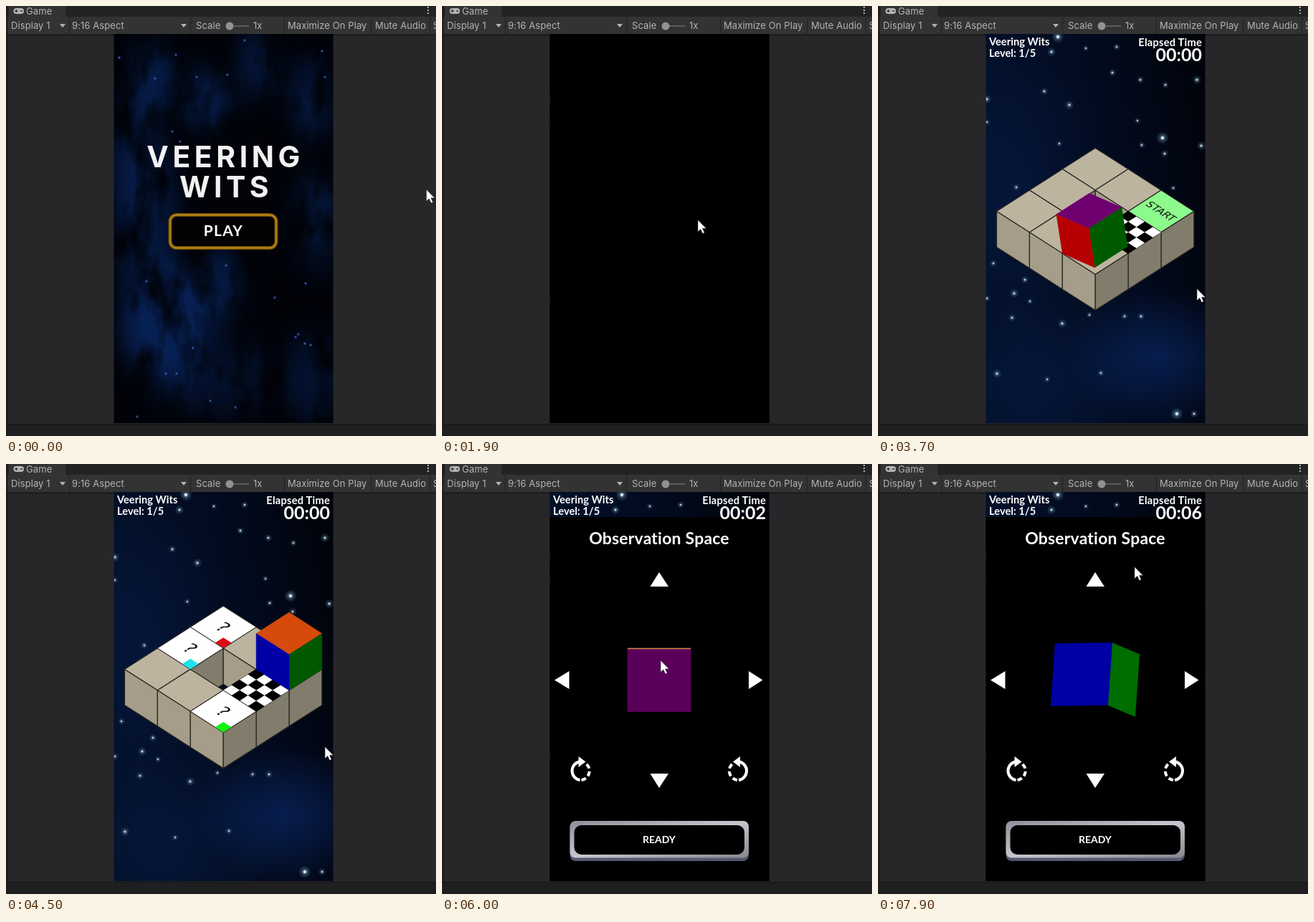
Write an HTML page that moves like this. It is 600 px wide and 600 px high and loops after 8000 ms.

```html
<!DOCTYPE html>
<html lang="en">
<head>
<meta charset="utf-8">
<title>Cube puzzle</title>
<style>
  html, body { margin: 0; width: 100%; height: 100%; overflow: hidden; background: #272628; }
  svg { display: block; width: 100%; height: 100%; }
  .ui { font: 13px Inter, sans-serif; letter-spacing: .08px; fill: #b4b4b4; }
  .game { font: 700 14.7px Lato, sans-serif; fill: #fff; }
  .title { font: 700 41px Inter, sans-serif; letter-spacing: 5.5px; fill: #f2f2f2; }
  .tile { font-family: "DejaVu Sans", sans-serif; text-anchor: middle; fill: #111; }
  .mid { text-anchor: middle; }
  .end { text-anchor: end; }
</style>
</head>
<body>
<svg viewBox="0 0 600 600">
  <defs>
    <clipPath id="screen"><rect x="150.5" y="39" width="306" height="543"/></clipPath>
    <filter id="cloud" x="-20%" y="-20%" width="140%" height="140%" color-interpolation-filters="sRGB">
      <feGaussianBlur in="SourceGraphic" stdDeviation="16 20" result="soft"/>
      <feTurbulence type="fractalNoise" baseFrequency=".028 .014" numOctaves="4" seed="4"/>
      <feColorMatrix values="0 0 0 0 0  0 0 0 0 0  0 0 0 0 0  2.6 0 0 0 -.6" result="wisps"/>
      <feComposite in="soft" in2="wisps" operator="in"/>
    </filter>
    <radialGradient id="star">
      <stop offset="0" stop-color="#fff"/>
      <stop offset=".16" stop-color="#cfe6ee"/>
      <stop offset=".36" stop-color="#6f95ae" stop-opacity=".45"/>
      <stop offset="1" stop-color="#4d7fa8" stop-opacity="0"/>
    </radialGradient>
    <radialGradient id="glow">
      <stop offset="0" stop-color="#0b2a6c" stop-opacity=".62"/>
      <stop offset=".5" stop-color="#0b2a6c" stop-opacity=".34"/>
      <stop offset="1" stop-color="#0b2a6c" stop-opacity="0"/>
    </radialGradient>
    <linearGradient id="sky" x1="0" y1=".3" x2="1" y2="0">
      <stop offset="0" stop-color="#031029"/>
      <stop offset=".55" stop-color="#020a1e"/>
      <stop offset="1" stop-color="#010308"/>
    </linearGradient>
    <linearGradient id="steel" x1="0" y1="0" x2="1" y2="1">
      <stop offset="0" stop-color="#8d8f9a"/>
      <stop offset=".5" stop-color="#c6c7cd"/>
      <stop offset="1" stop-color="#85878f"/>
    </linearGradient>
    <g id="turn" fill="none" stroke="#fff" stroke-width="4">
      <path d="M0 13A13 13 0 0 1 -1 -12.500"/>
      <path d="M6 -11.500A13 13 0 0 1 2 13" stroke-dasharray="7 4" stroke-dashoffset="-4"/>
      <path d="M-2 -20L8 -12.500L-2 -5Z" fill="#fff" stroke="none"/>
    </g>
  </defs>

  <g id="editor">
    <rect width="600" height="600" fill="#272628"/>
    <rect width="600" height="15" fill="#232324"/>
    <rect x="4" width="79" height="15" fill="#343334"/>
    <rect y="15" width="600" height="24" fill="#343334"/>
    <rect y="39" width="600" height="3" fill="#1f1f20"/>
    <rect y="583" width="600" height="17" fill="#1f1e20"/>
    <path d="M0 583.5H600" stroke="#151515"/>
    <path d="M1.5 0V583" stroke="#181818" stroke-width="1.5"/>
    <path d="M88.5 16V39M257.5 16V39M388.5 16V39M509.5 16V39M591.5 16V39" stroke="#262626" stroke-width="1.5"/>
    <path d="M75 25h8l-4 5zM244 25h8l-4 5z" fill="#b4b4b4"/>
    <path d="M316 28H339" stroke="#5c5c5c" stroke-width="2"/>
    <circle cx="312" cy="28" r="5.5" fill="#929292"/>
    <rect x="10.500" y="3" width="14.500" height="8" rx="4" fill="#b4b4b4"/>
    <path d="M12.500 7h4M14.500 5v4M20 7h3" stroke="#343334" stroke-width="1.3"/>
    <path d="M589 1v2M589 5v2M589 9v2" stroke="#b4b4b4" stroke-width="2"/>
    <g class="ui">
      <text x="28" y="12">Game</text><text x="7" y="32">Display 1</text>
      <text x="92" y="32">9:16 Aspect</text><text x="265" y="32">Scale</text>
      <text x="345" y="32">1x</text><text x="393" y="32">Maximize On Play</text>
      <text x="515" y="32">Mute Audio</text><text x="596" y="32">S</text>
    </g>
  </g>

  <g clip-path="url(#screen)">
    <g id="menu">
      <rect x="150" y="39" width="307" height="544" fill="#010309"/>
      <g id="nebula" filter="url(#cloud)"></g>
      <g id="sparks"></g>
      <text class="title mid" x="306" y="225">VEERING</text>
      <text class="title mid" x="307" y="267">WITS</text>
      <rect x="229" y="291.500" width="148" height="46" rx="9" fill="#020204" stroke="#6d4c06" stroke-width="5"/>
      <rect x="229" y="291.500" width="148" height="46" rx="9" fill="none" stroke="#b58414" stroke-width="2.400"/>
      <text class="game mid" x="303.500" y="321" style="font-size:21px;letter-spacing:1.2px">PLAY</text>
    </g>

    <g id="level">
      <rect x="150" y="39" width="307" height="544" fill="url(#sky)"/>
      <ellipse cx="390" cy="490" rx="130" ry="95" fill="url(#glow)"/>
      <ellipse cx="190" cy="240" rx="130" ry="210" fill="url(#glow)" opacity=".4"/>
      <ellipse cx="230" cy="520" rx="150" ry="130" fill="url(#glow)" opacity=".4"/>
      <g id="stars"></g>
      <g id="board" stroke="#26241f" stroke-width="1.200" stroke-linejoin="round"></g>
      <g id="puzzle"></g>
      <g id="roller"></g>
      <g id="observe">
        <rect x="150" y="74" width="307" height="509"/>
        <text class="game mid" x="303" y="112" style="font-size:23px;letter-spacing:.2px">Observation Space</text>
        <path fill="#fff" d="M290.500 171h25.500L303 151zM290.500 432h25.500L303 452zM157 301.500L177.500 289v25zM447.500 301.500L428 289v25z"/>
        <use href="#turn" transform="translate(192.500 428)"/>
        <use href="#turn" transform="translate(414 428) scale(-1 1)"/>
        <rect x="178.500" y="499" width="249.500" height="55" rx="8" fill="#565a70"/>
        <rect x="178.500" y="498" width="249.500" height="51.500" rx="8" fill="url(#steel)"/>
        <rect x="184.500" y="504" width="237.500" height="41" rx="10"/>
        <text class="game mid" x="303" y="528.500" style="font-size:14px">READY</text>
        <g id="viewer"></g>
        <path id="rim" d="M259 257.500H347" stroke="#d68a3c" stroke-width="1.400"/>
      </g>
      <g class="game">
        <text x="155" y="55">Veering Wits</text>
        <text x="155" y="70.500">Level: 1/5</text>
        <text class="end" x="452" y="55.500" style="letter-spacing:.2px">Elapsed Time</text>
        <text id="clock" class="end" x="452" y="77" style="font-size:25px"></text>
      </g>
    </g>
    <rect id="fade" x="150" y="39" width="307" height="544"/>
  </g>
  <path id="cursor" d="M0 0V16.500L3.800 13L6.600 19L9.300 17.800L6.600 11.900H11.800Z" fill="#fff" stroke="#222" stroke-width=".6"/>
</svg>

<script>
const LOOP = 8000;
const $ = id => document.getElementById(id);
const clamp = (v, a = 0, b = 1) => Math.min(b, Math.max(a, v));
const progress = (t, from, to) => clamp((t - from) / (to - from));
const smooth = p => p * p * (3 - 2 * p);
const show = (id, on) => $(id).setAttribute('display', on ? 'inline' : 'none');

function add(parent, tag, attrs, text = '') {
  const el = document.createElementNS('http://www.w3.org/2000/svg', tag);
  for (const k in attrs) el.setAttribute(k, attrs[k]);
  el.textContent = text;
  return parent.appendChild(el);
}
const pairs = s => s.split(' ').map(p => p.split(',').map(Number));

// Backgrounds
for (const [x, y, rx, ry, o] of [
  [205, 100, 30, 50, .8], [280, 135, 30, 45, .8], [350, 80, 30, 45, .6], [425, 130, 30, 55, .6],
  [435, 300, 28, 65, .7], [225, 440, 65, 80, .9], [300, 385, 30, 50, .7], [195, 300, 45, 110, .6],
  [290, 520, 90, 50, .4], [425, 520, 40, 60, .45], [180, 200, 40, 90, .5]
]) add($('nebula'), 'ellipse', { cx: x, cy: y, rx, ry, fill: '#08245c', opacity: o });

const sparks = pairs('237,68 266,99 333,48 441,63 445,99 232,175 243,189 196,384 375,407 418,387 404,462 ' +
  '408,458 417,471 261,477 183,573 307,362 223,513 238,513 285,551 320,560 425,473 158,72 208,101 309,96');
sparks.forEach(([cx, cy], i) => {
  add($('sparks'), 'circle', { cx, cy, r: 2.2, fill: '#2456b8', opacity: .4 });
  add($('sparks'), 'circle', { cx, cy, r: .8, fill: i % 3 ? '#7486dd' : '#62b0dd' });
});

const stars = pairs('232,119 267,138 290,59 333,57 366,103 445,103 362,160 368,194 400,206 451,195 253,192 ' +
  '193,253 327,93 242,64 412,254 161,359 205,382 190,401 212,412 152,408 187,435 257,443 295,431 344,433 ' +
  '367,433 166,513 236,521 311,512 441,569 152,130 152,162 401,110');
stars.forEach(([cx, cy], i) =>
  add($('stars'), 'circle', { cx, cy, r: [5.5, 6.5, 4.5, 5][i % 4], fill: 'url(#star)', opacity: .85 }));
for (const [cx, cy] of pairs('397,184 251,43 417,569'))
  add($('stars'), 'circle', { cx, cy, r: 9, fill: 'url(#star)' });

// Board: x runs right and down, y left and down, z up
const iso = ([x, y, z = 0]) => [303.2 + 45.9 * (x - y), 198.2 + 29.4 * (x + y) - 50 * z];
const path = (pts, project = iso) =>
  'M' + pts.map(p => project(p).map(n => n.toFixed(1)).join(' ')).join('L') + 'Z';
const quad = (parent, pts, fill, more) => add(parent, 'path', { d: path(pts), fill, ...more });
const square = (x, y, s = 1) => [[x, y], [x + s, y], [x + s, y + s], [x, y + s]];
const wallX = (x, y) => [[x, y], [x, y + 1], [x, y + 1, -1], [x, y, -1]];
const wallY = (x, y) => [[x, y], [x + 1, y], [x + 1, y, -1], [x, y, -1]];
function label(parent, x, y, size, text) {
  const [cx, cy] = iso([x + .5, y + .5]);
  add(parent, 'text', {
    class: 'tile', 'font-size': size, y: size * .36,
    transform: `matrix(.707 .454 -.707 .454 ${cx} ${cy})`, stroke: 'none'
  }, text);
}

const TOP = '#bdb4a0', LEFT = '#a59d89', RIGHT = '#817c6b';
const board = $('board');
const hole = add(board, 'clipPath', { id: 'hole' });
quad(hole, square(1, 1));
const well = add(board, 'g', { 'clip-path': 'url(#hole)' });
quad(well, wallX(1, 1), RIGHT);
quad(well, wallY(1, 1), LEFT);
for (let x = 0; x < 3; x++) for (let y = 0; y < 3; y++)
  if (x !== 1 || y !== 1) quad(board, square(x, y), x === 2 && y === 0 ? '#8cfb8c' : TOP);
for (let k = 0; k < 3; k++) {
  quad(board, wallY(k, 3), LEFT);
  quad(board, wallX(3, k), RIGHT);
}
for (let a = 0; a < 4; a++) for (let b = 0; b < 4; b++)
  quad(board, square(2 + a / 4, 1 + b / 4, .25), (a + b) % 2 ? '#fff' : '#000', { stroke: 'none' });
label(board, 2, 0, 17, 'START');

for (const [x, y, color] of [[0, 0, '#e00a14'], [0, 1, '#1fe3ea'], [2, 2, '#14f014']]) {
  quad($('puzzle'), square(x, y), '#fff', { stroke: '#26241f' });
  quad($('puzzle'), square(x + .75, y + .75, .25), color);
  label($('puzzle'), x, y, 29, '?');
}

// Cube: colour, outward normal, two tangents
const X = [1, 0, 0], Y = [0, 1, 0], Z = [0, 0, 1];
const neg = v => v.map(n => -n);
const FACES = [
  [[214, 74, 12], Z, X, Y], [[112, 0, 112], neg(Z), X, Y],
  [[0, 136, 0], X, Y, Z], [[20, 200, 210], neg(X), Y, Z],
  [[0, 0, 205], Y, X, Z], [[228, 0, 4], neg(Y), X, Z]
];
const dot = (a, b) => a.reduce((s, n, i) => s + n * b[i], 0);
const sum = (...vs) => [0, 1, 2].map(i => vs.reduce((s, v) => s + v[i], 0));

for (const id of ['roller', 'viewer']) FACES.forEach(() => add($(id), 'path', {}));

function drawCube(id, turn, centre, project, camera, shade) {
  FACES.forEach(([rgb, n, p, q], i) => {
    const el = $(id).children[i], normal = turn(n);
    const visible = dot(normal, camera) > .001;
    el.setAttribute('display', visible ? 'inline' : 'none');
    if (!visible) return;
    const corners = [[1, 1], [1, -1], [-1, -1], [-1, 1]].map(([a, b]) =>
      sum(centre, turn([0, 1, 2].map(k => (n[k] + a * p[k] + b * q[k]) / 2))));
    const fill = `rgb(${rgb.map(c => Math.round(c * shade(normal)))})`;
    el.setAttribute('d', path(corners, project));
    el.setAttribute('fill', fill);
    el.setAttribute('stroke', fill);
    el.setAttribute('stroke-width', .5);
  });
}

// Tips a vector over towards a ground direction
function tip([x, y, z], [dx, dy], angle) {
  const s = x * dx + y * dy, c = Math.cos(angle), k = Math.sin(angle);
  const shift = s * c + z * k - s;
  return [x + shift * dx, y + shift * dy, z * c - s * k];
}

const ROLL_START = 2642, ROLL_TIME = 180;
const ROLLS = [[-1, 0], [-1, 0], [0, 1], [0, 1], [1, 0], [1, 0], [0, -1], [0, -1]];

function drawRoller(t) {
  const at = clamp((t - ROLL_START) / ROLL_TIME, 0, ROLLS.length);
  const step = Math.min(Math.floor(at), ROLLS.length - 1);
  const done = ROLLS.slice(0, step), dir = ROLLS[step];
  const angle = (at - step) * Math.PI / 2;
  let cell = [2.5, .5, 0];
  for (const [dx, dy] of done) cell = sum(cell, [dx, dy, 0]);
  const half = [dir[0] / 2, dir[1] / 2, 0];
  const centre = sum(cell, half, tip(sum(neg(half), [0, 0, .5]), dir, angle));
  const turn = v => tip(done.reduce((u, d) => tip(u, d, Math.PI / 2), v), dir, angle);
  drawCube('roller', turn, centre, iso, [.543, .543, .64],
    ([x, y, z]) => z * z + .8 * y * y + .65 * x * x);
}

const spin = (a, b, deg) => {
  const c = Math.cos(deg * Math.PI / 180), s = Math.sin(deg * Math.PI / 180);
  return [a * c - b * s, a * s + b * c];
};

function drawViewer(t) {
  const pitch = -90 + 78.5 * smooth(progress(t, 6350, 7500));
  const side = smooth(progress(t, 7100, 7900));
  const turn = ([i, j, k]) => {
    let x = i, y = -k, z = -j;
    [x, y] = spin(x, y, 4.4 * side);
    [z, x] = spin(z, x, 25.5 * side);
    [y, z] = spin(y, z, pitch);
    return [x, y, z];
  };
  drawCube('viewer', turn, [0, 0, 0], ([x, y]) => [303 + 88.5 * x, 301.5 + 88.5 * y], [0, 0, -1],
    ([, y]) => .8 * clamp(1.05 * (1 - y)) * (y > .9 ? progress(y, 1, .9) : 1));
}

const CURSOR = [
  [0, 586.5, 256], [150, 586.5, 256], [850, 345, 308], [1300, 345, 308], [1900, 357, 298.5],
  [2650, 445, 394.5], [4700, 445, 394.5], [5300, 403, 544], [5420, 403, 544], [5950, 305, 274],
  [6350, 305, 274], [7300, 309, 352], [7900, 358, 143.5], [LOOP, 358, 143.5]
];
function moveCursor(t) {
  const i = CURSOR.findIndex((k, n) => n && t <= k[0]);
  const [t0, x0, y0] = CURSOR[i - 1], [t1, x1, y1] = CURSOR[i];
  const p = smooth(progress(t, t0, t1));
  $('cursor').setAttribute('transform', `translate(${x0 + (x1 - x0) * p} ${y0 + (y1 - y0) * p})`);
}

function render(t) {
  const inLevel = t >= 1900, observing = t >= 5600;
  show('menu', !inLevel);
  show('level', inLevel);
  show('board', !observing);
  show('roller', !observing);
  show('puzzle', t >= 4500 && !observing);
  show('observe', observing);
  show('rim', t < 6350);
  $('fade').setAttribute('opacity', inLevel ? 1 - progress(t, 1950, 2450) : progress(t, 1250, 1750));
  const seconds = Math.floor(Math.max(0, t - 4600) / 500);
  $('clock').textContent = '00:' + String(seconds).padStart(2, '0');
  if (observing) drawViewer(t);
  else drawRoller(t);
  moveCursor(t);
}

const begin = performance.now();
function frame() {
  render((performance.now() - begin) % LOOP);
  requestAnimationFrame(frame);
}
frame();
</script>
</body>
</html>
```
